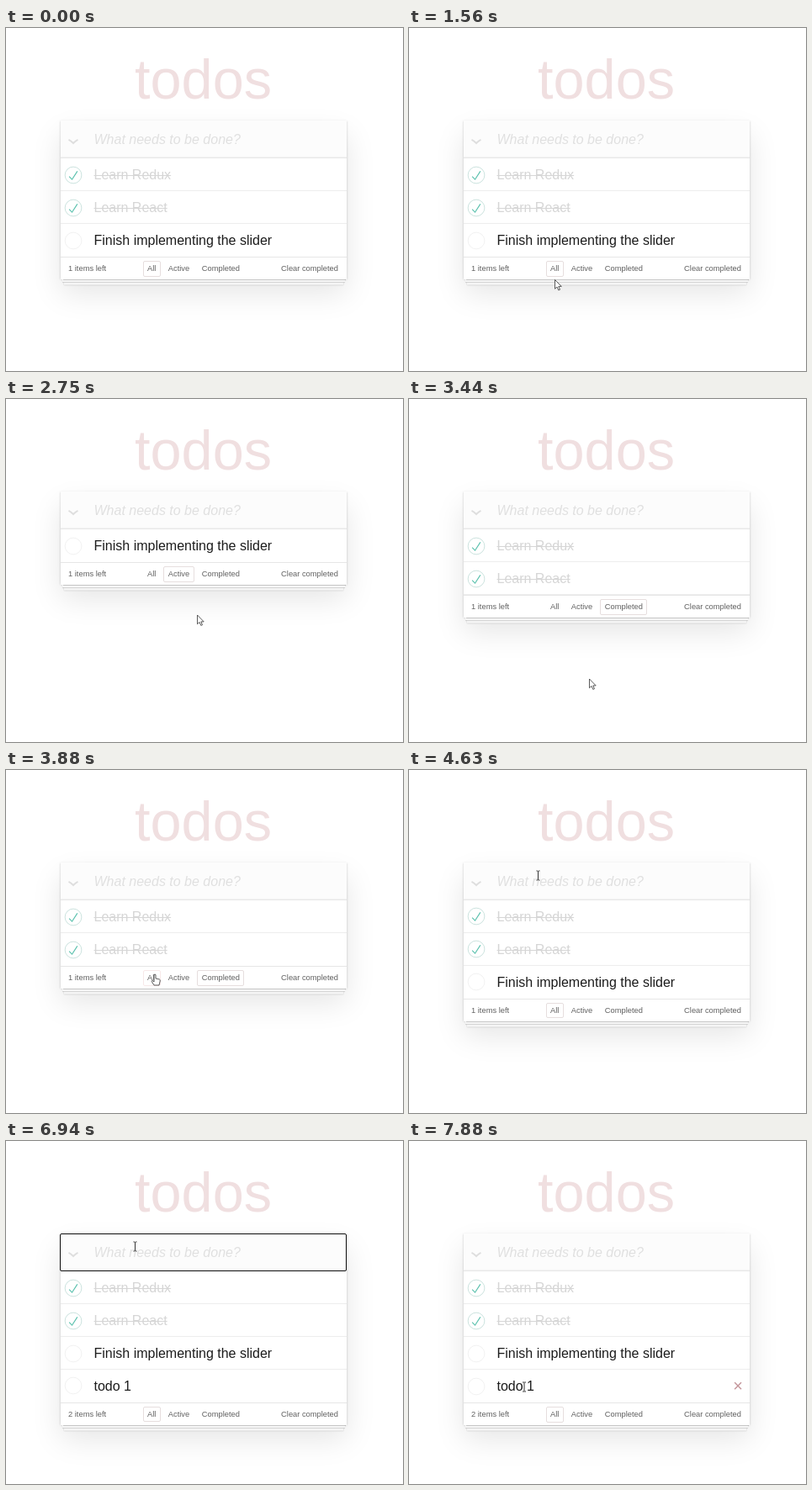
These frames come from a looping animation (472 by 408 pixels, 8 s). An HTML page:

```html
<!DOCTYPE html>
<html lang="en">
<head>
<meta charset="utf-8">
<title>todos</title>
<style>
  html, body { margin: 0; width: 100%; height: 100%; overflow: hidden; background: #fff; }
  body { position: relative; font: 16px/19px "Liberation Sans", Arial, sans-serif; color: #1c1c1c; }
  h1 {
    position: absolute; left: 0; top: 23px; width: 469px; margin: 0; text-align: center;
    font-size: 66.67px; line-height: 76px; font-weight: 400; color: #f0dfe0;
  }
  #app {
    position: absolute; left: 64.5px; top: 110px; width: 340.5px; background: #fff;
    box-shadow:
      0 .67px .67px rgba(0, 0, 0, .2),
      0 5.33px 0 -2px #f6f6f6, 0 6px .67px -2px rgba(0, 0, 0, .2),
      0 10.67px 0 -4px #f6f6f6, 0 11.33px 1.33px -4px rgba(0, 0, 0, .2),
      0 1.33px 2.67px rgba(0, 0, 0, .2), 0 16.67px 33.33px rgba(0, 0, 0, .1);
  }
  #entry {
    position: relative; height: 45px; box-sizing: border-box; border-bottom: 1px solid #e6e6e6;
    background: #fcfcfc; box-shadow: inset 0 -1.33px .67px rgba(0, 0, 0, .03);
  }
  #entry span { position: absolute; left: 40px; top: 13px; white-space: pre; }
  #entry .empty { font-style: italic; color: #e0e0e0; }
  #entry svg { position: absolute; left: 8.5px; top: 20.5px; }
  #caret { position: absolute; top: 13.5px; width: 1px; height: 18px; background: #888; }
  #ring {
    position: absolute; left: -.5px; top: 0; width: 341px; height: 45px; box-sizing: border-box;
    border: 1.5px solid #101010; border-radius: 2px;
  }
  .row { position: relative; overflow: hidden; box-shadow: inset 0 -1px #ededed; }
  .row:last-child { box-shadow: none; }
  .row svg { position: absolute; left: 4.5px; top: 50%; margin-top: -11px; }
  .row span { position: absolute; left: 40px; top: 10px; white-space: pre; }
  .row.done span { color: #d6d6d6; text-decoration: line-through; }
  .row b {
    position: absolute; right: 8px; top: 50%; margin-top: -12px;
    font: 20px/23px "Liberation Sans", Arial, sans-serif; color: #c4969b;
  }
  footer {
    position: relative; height: 27px; box-sizing: border-box; border-top: 1px solid #e6e6e6;
    font-size: 9.33px; line-height: 16.5px; color: #606060;
  }
  footer > * { position: absolute; top: 5px; white-space: pre; }
  footer a {
    top: 4px; padding: 0 4.5px; border: 1px solid transparent; border-radius: 2px;
  }
  footer a.hover { border-color: rgba(175, 47, 47, .1); }
  footer a.selected { border-color: #e6dede; }
  #pointers { position: absolute; left: 0; top: 0; }
</style>
</head>
<body>
<h1>todos</h1>
<div id="app">
  <div id="entry">
    <svg width="14" height="9"><path d="M1.5 1.8Q4 3 7 6Q10 3 12.5 1.8" fill="none" stroke="#dedede" stroke-width="2"/></svg>
    <span id="text"></span><i id="caret"></i><div id="ring"></div>
  </div>
  <div id="list"></div>
  <footer>
    <span id="count" style="left:9.5px"></span>
    <a style="left:98px">All</a><a style="left:122.8px">Active</a><a style="left:162.8px">Completed</a>
    <span style="right:10px">Clear completed</span>
  </footer>
</div>
<svg id="pointers" width="472" height="408">
  <g id="arrow"><path d="M.5 0V10.7L3 8.5L4.8 12.4L6.5 11.7L4.8 7.9H8.2Z" fill="#fff" stroke="#333" stroke-width=".8"/></g>
  <g id="beam"><path d="M-2-5.5H-.6L0-5L.6-5.5H2M0-5V5M-2 5.5H-.6L0 5L.6 5.5H2" fill="none" stroke="#333"/></g>
  <g id="hand"><path d="M-1 6V.6Q0-.7 1 .6V5L5.5 6Q6.5 6.3 6.2 8L5 13H-1L-3.8 8.5Q-3.6 6.7-2 8L-1 9Z" fill="#fff" stroke="#333" stroke-width=".8"/></g>
</svg>
<script>
const LOOP = 8000, ROW = 39, LIST_TOP = 155;
const $ = id => document.getElementById(id);

const FILTERS = [[0, 0], [2190, 1], [3000, 2], [4190, 0]];
const ADDED = 6440, FOCUS = 4690, BLUR = 7480;
const KEYS = [5380, 5560, 5690, 5940, 6060, 6250];
const TYPED = "todo 1";

// Each event is [time, shown]; the first one is the settled start state.
const items = [
  { label: "Learn Redux", done: true, events: [[-9999, true], [2190, false], [3000, true]] },
  { label: "Learn React", done: true, events: [[-9999, true], [2190, false], [3000, true]] },
  { label: "Finish implementing the slider", events: [[-9999, true], [3000, false], [4190, true]] },
  { label: TYPED, events: [[-9999, false], [ADDED, true]] }
];

// Pointer stops: time, x, y
const PATH = [
  [940, 98, 345], [1560, 173, 299.5], [1690, 238, 297.5], [1810, 238, 297.5], [1940, 208, 283],
  [2190, 208, 283], [2450, 222, 390], [2530, 223, 389], [2750, 227, 257], [2940, 250, 207],
  [3000, 250, 207], [3380, 215, 333], [3440, 214, 333], [3750, 183, 251], [3810, 183, 251],
  [3880, 177, 243], [4190, 177, 243], [4600, 153.5, 125.5], [7130, 153.5, 125.5],
  [7430, 145, 364], [7500, 145, 364], [7860, 137, 292.5]
];

const last = (list, t) => list.filter(e => e[0] <= t).pop();

// Underdamped on entry, critically damped on exit; s in seconds.
function enterSpring(s) {
  const decay = 10, w = 12.2;
  return 1 - Math.exp(-decay * s) * (Math.cos(w * s) + decay / w * Math.sin(w * s));
}
const leaveSpring = s => Math.exp(-18 * s) * (1 + 18 * s);

function pointerAt(t) {
  if (t < PATH[0][0]) return null;
  const i = PATH.findIndex(p => p[0] > t);
  if (i < 0) return PATH[PATH.length - 1].slice(1);
  const [t0, x0, y0] = PATH[i - 1], [t1, x1, y1] = PATH[i];
  const u = (t - t0) / (t1 - t0), k = u * u * (3 - 2 * u);
  return [x0 + (x1 - x0) * k, y0 + (y1 - y0) * k];
}

for (const item of items) {
  const tick = item.done ? '<path d="M72 25L42 71 27 56l-4 4 20 20 34-52z" fill="#5dc2af"/>' : "";
  const row = item.el = document.createElement("div");
  row.className = item.done ? "row done" : "row";
  row.innerHTML = `<svg width="22" height="22" viewBox="-5.7 -5.7 111.4 111.4">
    <circle cx="50" cy="50" r="50" fill="none" stroke="${item.done ? "#bddad5" : "#ededed"}" stroke-width="4"/>${tick}</svg>
    <span>${item.label}</span><b>×</b>`;
}

const links = [...document.querySelectorAll("footer a")];
const measure = document.createElement("canvas").getContext("2d");
measure.font = '16px "Liberation Sans", Arial, sans-serif';

function drawEntry(t) {
  const typed = t < ADDED ? TYPED.slice(0, KEYS.filter(k => k <= t).length) : "";
  const focused = t >= FOCUS && t < BLUR;
  const lastAction = Math.max(FOCUS, ...[...KEYS, ADDED].filter(k => k <= t));
  $("text").textContent = typed || "What needs to be done?";
  $("text").className = typed ? "" : "empty";
  $("ring").hidden = !focused;
  $("caret").hidden = !focused || (t - lastAction) % 1000 >= 500;
  $("caret").style.left = 40 + measure.measureText(typed).width + "px";
}

function drawRows(t, pointer) {
  let y = LIST_TOP;
  for (const { el, events } of items) {
    const [start, shown] = last(events, t), s = (t - start) / 1000;
    const size = shown ? enterSpring(s) : leaveSpring(s), height = ROW * size;
    const present = shown || height > .1;
    if (present !== el.isConnected) {
      if (!present) el.remove();
      else {
        const next = items.slice(items.findIndex(i => i.el === el) + 1).find(i => i.el.isConnected);
        $("list").insertBefore(el, next ? next.el : null);
      }
    }
    if (!present) continue;
    el.style.height = height + "px";
    el.style.opacity = shown ? 1 : size;
    const hover = pointer && pointer[0] > 65 && pointer[0] < 405 && pointer[1] >= y && pointer[1] < y + height;
    el.lastChild.hidden = !hover;
    y += height;
  }
  return y;
}

function drawFooter(t, top, pointer) {
  const selected = last(FILTERS, t)[1];
  let hovered = false;
  $("count").textContent = (t < ADDED ? 1 : 2) + " items left";
  links.forEach((a, i) => {
    const x = 64.5 + a.offsetLeft;
    const hover = pointer && pointer[0] >= x && pointer[0] <= x + a.offsetWidth &&
      pointer[1] >= top + 4 && pointer[1] <= top + 24;
    hovered = hovered || hover;
    a.className = i === selected ? "selected" : hover ? "hover" : "";
  });
  return hovered;
}

function drawPointer(pointer, listBottom, onLink) {
  const onText = pointer && pointer[0] > 104 && pointer[1] >= 110 && pointer[1] < listBottom;
  const kind = !pointer ? "" : onLink ? "hand" : onText ? "beam" : "arrow";
  for (const id of ["arrow", "beam", "hand"]) {
    $(id).style.display = id === kind ? "" : "none";
    if (id === kind) $(id).setAttribute("transform", `translate(${pointer})`);
  }
}

function draw(t) {
  const pointer = pointerAt(t);
  drawEntry(t);
  const bottom = drawRows(t, pointer);
  drawPointer(pointer, bottom, drawFooter(t, bottom, pointer));
}

const begin = performance.now();
function frame(now) {
  draw(Math.max(0, now - begin) % LOOP);
  requestAnimationFrame(frame);
}
draw(0);
requestAnimationFrame(frame);
</script>
</body>
</html>
```
